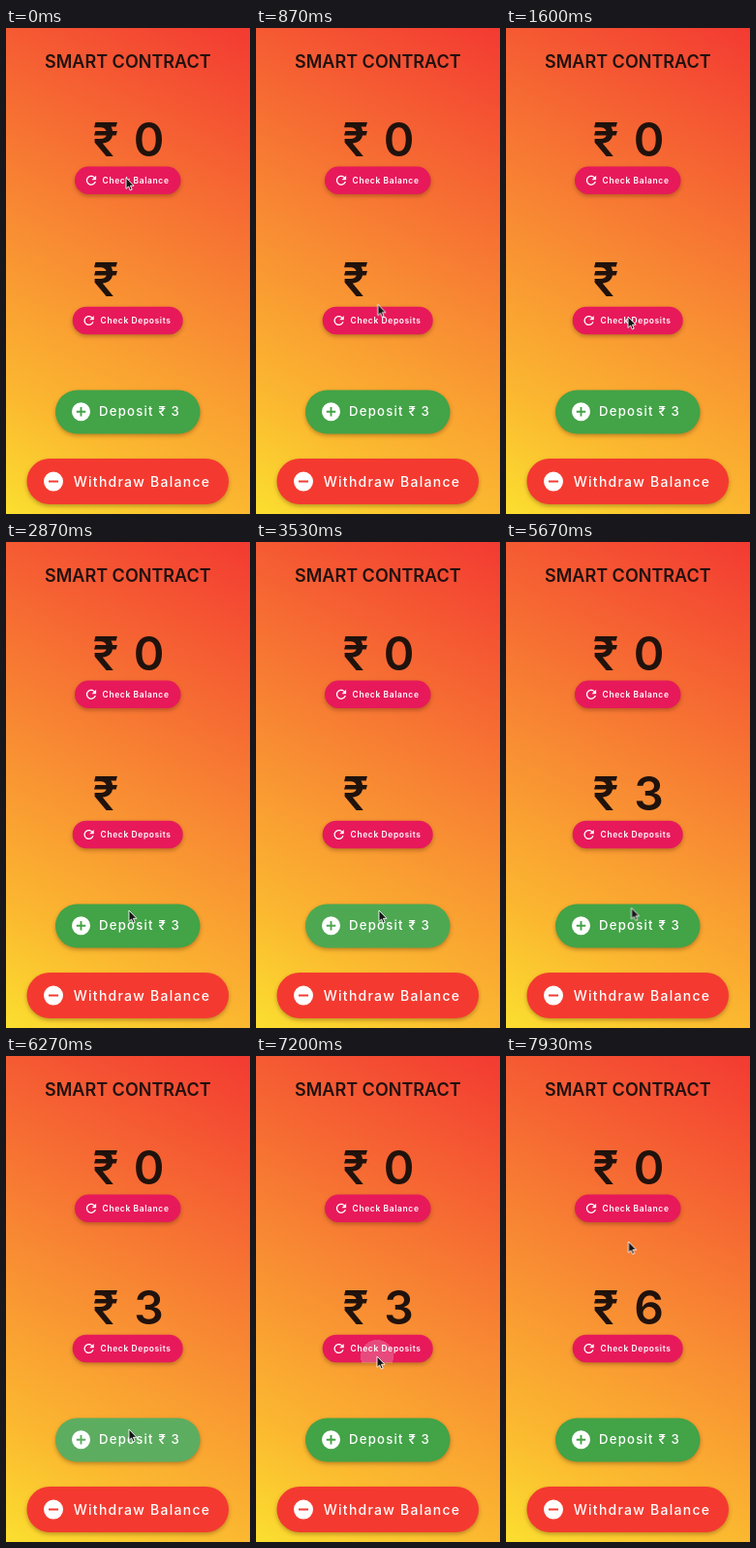
Write an HTML page that moves like this. It is 252 by 500 pixels and loops after 8000 ms.

```html
<!DOCTYPE html>
<html lang="en">
<head>
<meta charset="utf-8">
<title>Smart Contract</title>
<style>
  html, body { margin: 0; width: 100%; height: 100%; overflow: hidden; }
  body { background: linear-gradient(206.75deg, #f33a32, #f88a33 50%, #fbb830 80%, #fbdf2f); }
  svg { display: block; width: 100%; height: 100%; }
  text { font-family: Inter, "Noto Sans", sans-serif; fill: #fff; }
  .title { font-size: 18px; font-weight: 600; fill: #21110f; text-anchor: middle; }
  .amount { font-size: 48px; font-weight: 600; fill: #20120c; text-anchor: middle; }
  .small { font-size: 8.46px; font-weight: 600; letter-spacing: .62px; }
  .deposit { font-size: 13.2px; font-weight: 500; letter-spacing: 1.2px; }
  .withdraw { font-size: 14px; font-weight: 500; letter-spacing: 1.25px; }
  .pill { filter: drop-shadow(0 2px 2px rgba(60, 20, 0, .32)); }
  .ripple { fill: #e4e4e4; opacity: 0; }
</style>
</head>
<body>
<svg id="stage" viewBox="0 0 252 500" preserveAspectRatio="none">
  <text class="title" x="125.8" y="41">SMART CONTRACT</text>
  <text class="amount" x="103" y="132">₹</text>
  <text class="amount" x="147.5" y="132">0</text>
  <text class="amount" x="103" y="276">₹</text>
</svg>
<script>
const LOOP = 8000;
const stage = document.getElementById('stage');

const REFRESH = 'M17.65 6.35C16.2 4.9 14.21 4 12 4c-4.42 0-7.99 3.58-7.99 8s3.57 8 7.99 8' +
  'c3.73 0 6.84-2.55 7.73-6h-2.08c-.82 2.33-3.04 4-5.65 4-3.31 0-6-2.69-6-6s2.69-6 6-6' +
  'c1.66 0 3.14.69 4.22 1.78L13 11h7V4l-2.35 2.35z';
const DISC = 'M12 2a10 10 0 1 0 0 20a10 10 0 1 0 0-20z';
const MINUS = DISC + 'M7 11v2h10v-2z';
const PLUS = DISC + 'M7 11v2h4v4h2v-4h4v-2h-4v-4h-2v4z';

const BUTTONS = {
  balance: { box: [71, 142.5, 109.5, 28.5], fill: '#e7195b', icon: REFRESH, at: [88, 156.8], scale: .64,
    label: 'Check Balance', text: [99.6, 159.8], style: 'small' },
  deposits: { box: [68.7, 286.7, 114, 28.5], fill: '#e7195b', icon: REFRESH, at: [85.6, 301], scale: .64,
    label: 'Check Deposits', text: [97.6, 304], style: 'small' },
  deposit: { box: [51, 372.5, 149.5, 45], fill: '#43a347', icon: PLUS, at: [77.5, 394.8], scale: .95,
    label: 'Deposit ₹ 3', text: [96, 399.3], style: 'deposit' },
  withdraw: { box: [21.5, 443, 208.5, 47], fill: '#f43a30', icon: MINUS, at: [49, 466.6], scale: 1,
    label: 'Withdraw Balance', text: [69.8, 471.6], style: 'withdraw' }
};

// button, x, y, start, hold, length, growth in px per ms
const TAPS = [
  ['balance', 124, 154, 100, 250, 460, .24],
  ['deposits', 126, 297, 1050, 260, 470, .24],
  ['deposit', 127, 379, 3270, 50, 340, .4],
  ['deposits', 118, 303, 4670, 270, 500, .22],
  ['deposit', 127, 384, 6000, 150, 500, .4],
  ['deposits', 125, 309, 7130, 260, 470, .24]
];

// time, x, y of the pointer tip
const PATH = [
  [0, 124, 154], [570, 124, 154], [950, 126, 297], [2000, 126, 297],
  [2550, 127, 379], [4000, 127, 379], [4450, 118, 303], [5340, 118, 303],
  [5530, 141, 342], [5730, 127, 384], [6740, 127, 384], [7080, 125, 309],
  [7740, 125, 309], [7930, 126.5, 191], [LOOP, 126.5, 191]
];

// digit, from, to
const COUNTS = [['0', 0, 4800], ['3', 4800, 7330], ['6', 7330, LOOP]];

function add(tag, attrs, parent = stage) {
  const el = document.createElementNS('http://www.w3.org/2000/svg', tag);
  for (const key in attrs) el.setAttribute(key, attrs[key]);
  parent.append(el);
  return el;
}

function loop(el, frames) {
  el.animate(frames.map(([t, style]) => ({ offset: t / LOOP, ...style })),
    { duration: LOOP, iterations: Infinity });
}

function addRipple([, x, y, start, hold, length, speed], parent) {
  const el = add('circle', { class: 'ripple', r: 1 }, parent);
  const pose = (dt, opacity) =>
    [start + dt, { opacity, transform: `translate(${x}px, ${y}px) scale(${dt * speed})` }];
  const hidden = { opacity: 0, transform: `translate(${x}px, ${y}px) scale(0)` };
  loop(el, [[0, hidden], [start, hidden], pose(0, .25), pose(hold, .25), pose(length, 0), [LOOP, hidden]]);
}

function addButton(name, b) {
  const [x, y, width, height] = b.box;
  const shape = { x, y, width, height, rx: height / 2 };
  add('rect', { ...shape, fill: b.fill, class: 'pill' });
  add('rect', shape, add('clipPath', { id: name }));
  const ink = add('g', { 'clip-path': `url(#${name})` });
  TAPS.filter(tap => tap[0] === name).forEach(tap => addRipple(tap, ink));
  add('path', { d: b.icon, fill: '#fff', 'fill-rule': 'evenodd',
    transform: `translate(${b.at}) scale(${b.scale}) translate(-12 -12)` });
  add('text', { class: b.style, x: b.text[0], y: b.text[1] }).textContent = b.label;
}

for (const [digit, from, to] of COUNTS) {
  const el = add('text', { class: 'amount', x: 147.5, y: 276 });
  el.textContent = digit;
  const on = { opacity: 1 }, off = { opacity: 0 };
  loop(el, [[0, off], [from, off], [from, on], [to, on], [to, off], [LOOP, off]]);
}

for (const name in BUTTONS) addButton(name, BUTTONS[name]);

const pointer = add('path', {
  d: 'M0 0V11.4L2.6 9L4.3 13L6.2 12.2L4.5 8.3H8Z',
  fill: '#151515', stroke: '#fff', 'stroke-width': .9, 'stroke-linejoin': 'round'
});
loop(pointer, PATH.map(([t, x, y]) =>
  [t, { transform: `translate(${x}px, ${y}px)`, easing: 'ease-in-out' }]));
</script>
</body>
</html>
```
